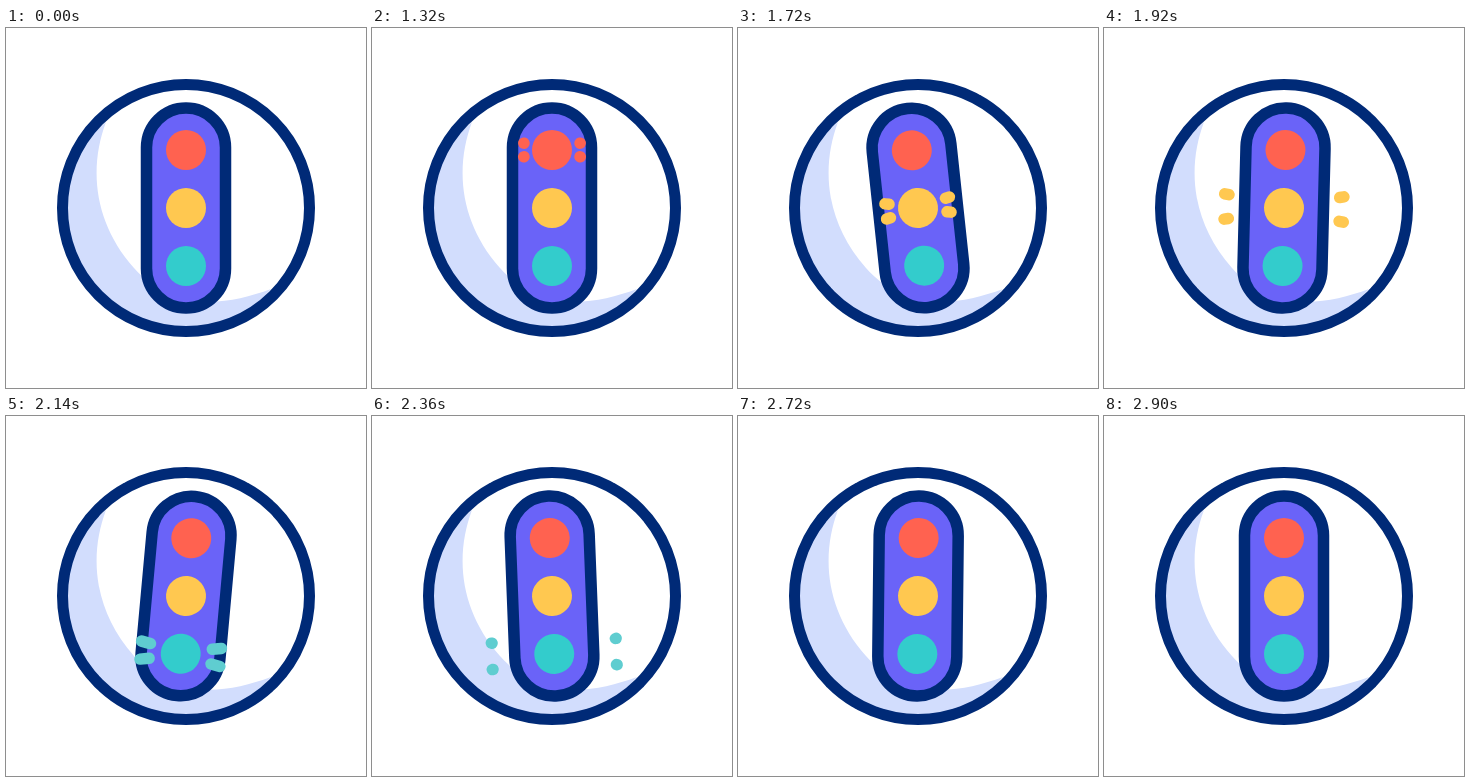
These frames come from a looping animation (360x360 px, 3.32 s). An HTML page:

```html
<!DOCTYPE html>
<html lang="en">
<head>
<meta charset="utf-8">
<title>Traffic light</title>
<style>
  html, body { margin: 0; width: 100%; height: 100%; overflow: hidden; background: #fff; }
  svg { display: block; width: 100vw; height: 100vh; }
</style>
</head>
<body>
<svg viewBox="0 0 360 360">
  <path fill="#d2ddfd" d="M100 94C82 142 89 196 128 240S219 278 265 261A118 118 0 1 1 100 94"/>
  <circle cx="180" cy="180" r="123.5" fill="none" stroke="#002a77" stroke-width="11"/>
  <g id="light">
    <rect x="140.5" y="80" width="79" height="200" rx="39.5" fill="#6a63f8" stroke="#002a77" stroke-width="11.5"/>
  </g>
</svg>
<script>
const LOOP = 3320, BURST = 320;
const light = document.getElementById('light');

const lamps = [
  { y: 122, color: '#ff6250', spark: '#ff6250', start: 1320 },
  { y: 180, color: '#ffc850', spark: '#ffc850', start: 1700 },
  { y: 238, color: '#33cccc', spark: '#5fcdd0', start: 2080 },
];

// [time, degrees] turning points of the swing
const swing = [[1320, 0], [1700, -6.2], [2080, 6], [2390, -2.4], [2650, 0.8], [2900, 0]];

const easeInOut = u => (1 - Math.cos(Math.PI * u)) / 2;
const easeOut = u => 1 - (1 - u) ** 2;

function add(tag, attrs) {
  const el = document.createElementNS('http://www.w3.org/2000/svg', tag);
  for (const name in attrs) el.setAttribute(name, attrs[name]);
  return light.appendChild(el);
}

for (const lamp of lamps) {
  lamp.sparks = add('path', { stroke: lamp.spark, 'stroke-width': 11.5, 'stroke-linecap': 'round' });
  add('circle', { cx: 180, cy: lamp.y, r: 20, fill: lamp.color });
}

function angleAt(t) {
  const i = swing.findIndex(([time]) => time > t);
  if (i < 1) return 0;
  const [t0, a0] = swing[i - 1], [t1, a1] = swing[i];
  return a0 + (a1 - a0) * easeInOut((t - t0) / (t1 - t0));
}

// Four dashes fly outwards, two on each side of the lamp
function sparkPath(y, u) {
  if (u <= 0 || u >= 1) return '';
  const point = (sx, sy, k) => `${180 + sx * (28 + 35 * k)} ${y + sy * (6.8 + 6.5 * k)}`;
  let d = '';
  for (const sx of [-1, 1])
    for (const sy of [-1, 1])
      d += `M${point(sx, sy, easeInOut(u))}L${point(sx, sy, easeOut(u))}`;
  return d;
}

function draw() {
  const t = performance.now() % LOOP;
  light.setAttribute('transform', `rotate(${angleAt(t)} 180 180)`);
  for (const { sparks, y, start } of lamps)
    sparks.setAttribute('d', sparkPath(y, (t - start) / BURST));
  requestAnimationFrame(draw);
}
draw();
</script>
</body>
</html>
```
